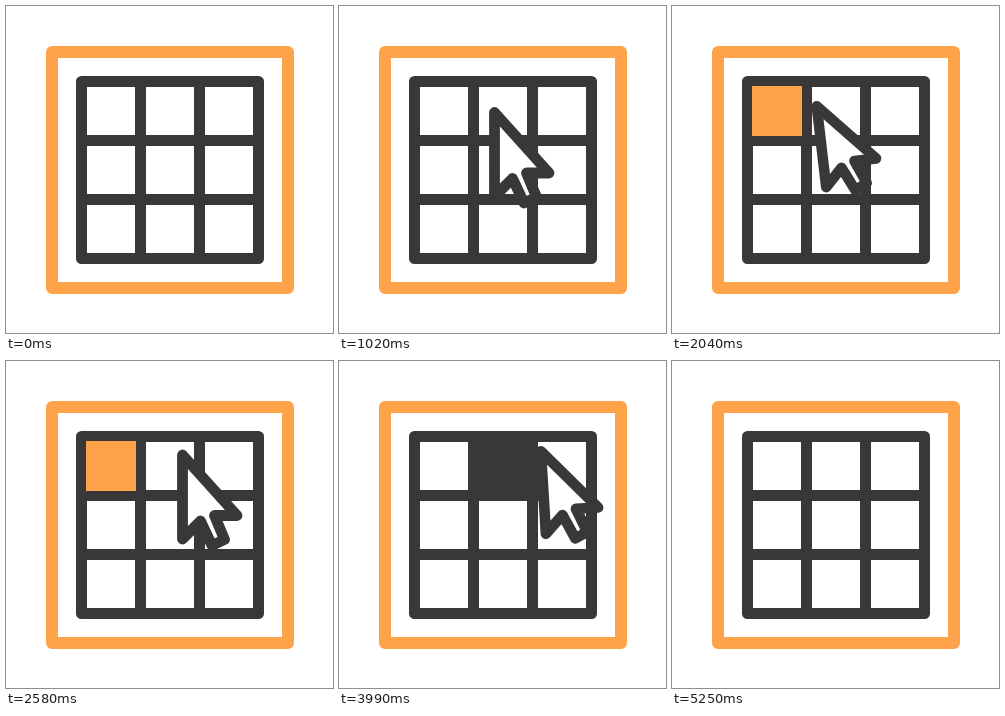
An HTML page for the animation above (5.4 s loop, 327x327 px).

```html
<!DOCTYPE html>
<html lang="en">
<head>
<meta charset="utf-8">
<title>Grid selection</title>
<style>
  html, body { margin: 0; width: 100%; height: 100%; overflow: hidden; background: #fff; }
  svg { display: block; width: 100%; height: 100%; }
</style>
</head>
<body>
<svg viewBox="0 0 327 327" stroke-linejoin="round" stroke-linecap="round">
  <rect x="46" y="46" width="236" height="236" fill="none" stroke="#ffa34a" stroke-width="12"/>
  <path d="M75.5 75.5H252.5V252.5H75.5ZM134.5 75.5V252.5M193.5 75.5V252.5M75.5 134.5H252.5M75.5 193.5H252.5"
        fill="none" stroke="#383838" stroke-width="11"/>
  <rect id="first" x="80" y="80" width="50" height="50" fill="#ffa34a"/>
  <rect id="second" x="139" y="80" width="50" height="50" fill="#383838"/>
  <path id="cursor" d="M0 0L54.5 60.5H32L42 84.5L29.5 90.5L18 66L0 84Z" fill="#fff" stroke="#383838" stroke-width="10.8"/>
</svg>
<script>
const LOOP = 5400, STEP = 30;
const ENTER = 30, PRESS = 1770, PERIOD = 1800, EXIT = 5190;
const PUSH = 570, RELEASE = 810;
const $ = id => document.getElementById(id);
const first = $('first'), second = $('second'), cursor = $('cursor');

const easeIn = u => u * u;
const easeOut = u => 1 - (1 - u) ** 2;
const easeBoth = u => u * u * (3 - 2 * u);

const pose = (x, y, angle = 0, size = 1) => ({ x, y, angle, size });
const pressed = (x, y) => pose(x, y, -15, 0.935);

const origin = pose(137, 229, -60, 0);
const moves = [];
const move = (start, length, ease, to) => moves.push({ start, length, ease, to });

// Push down on a cell, then glide to the next resting place
function click(time, down, rest) {
  move(time - PUSH, PUSH, easeIn, down);
  move(time, RELEASE, easeOut, rest);
}

move(ENTER, 720, easeBoth, pose(155.5, 106.5));
click(PRESS, pressed(105, 108), pose(176.5, 94));
click(PRESS + PERIOD, pressed(153.5, 117.5), pose(216.5, 82));
move(EXIT - PUSH, PUSH, easeIn, pose(336, 7));

function poseAt(t) {
  const p = { ...origin };
  for (const { start, length, ease, to } of moves) {
    const u = Math.min(1, Math.max(0, (t - start) / length));
    for (const k in p) p[k] += (to[k] - p[k]) * ease(u);
  }
  // Growing in is quicker than the entry path
  if (t < PRESS - PUSH) p.size = easeOut(Math.min(1, Math.max(0, (t - ENTER) / 210)));
  return p;
}

function show(el, on) {
  el.style.visibility = on ? 'visible' : 'hidden';
}

function draw(time) {
  const t = Math.floor(time % LOOP / STEP) * STEP;
  const { x, y, angle, size } = poseAt(t);
  show(first, t >= PRESS && t < PRESS + PERIOD);
  show(second, t >= PRESS + PERIOD && t < 5250);
  show(cursor, t > ENTER && t < EXIT);
  cursor.setAttribute('transform', `translate(${x} ${y}) rotate(${angle}) scale(${size})`);
}

const start = performance.now();
function tick() {
  draw(performance.now() - start);
  requestAnimationFrame(tick);
}
tick();
</script>
</body>
</html>
```
